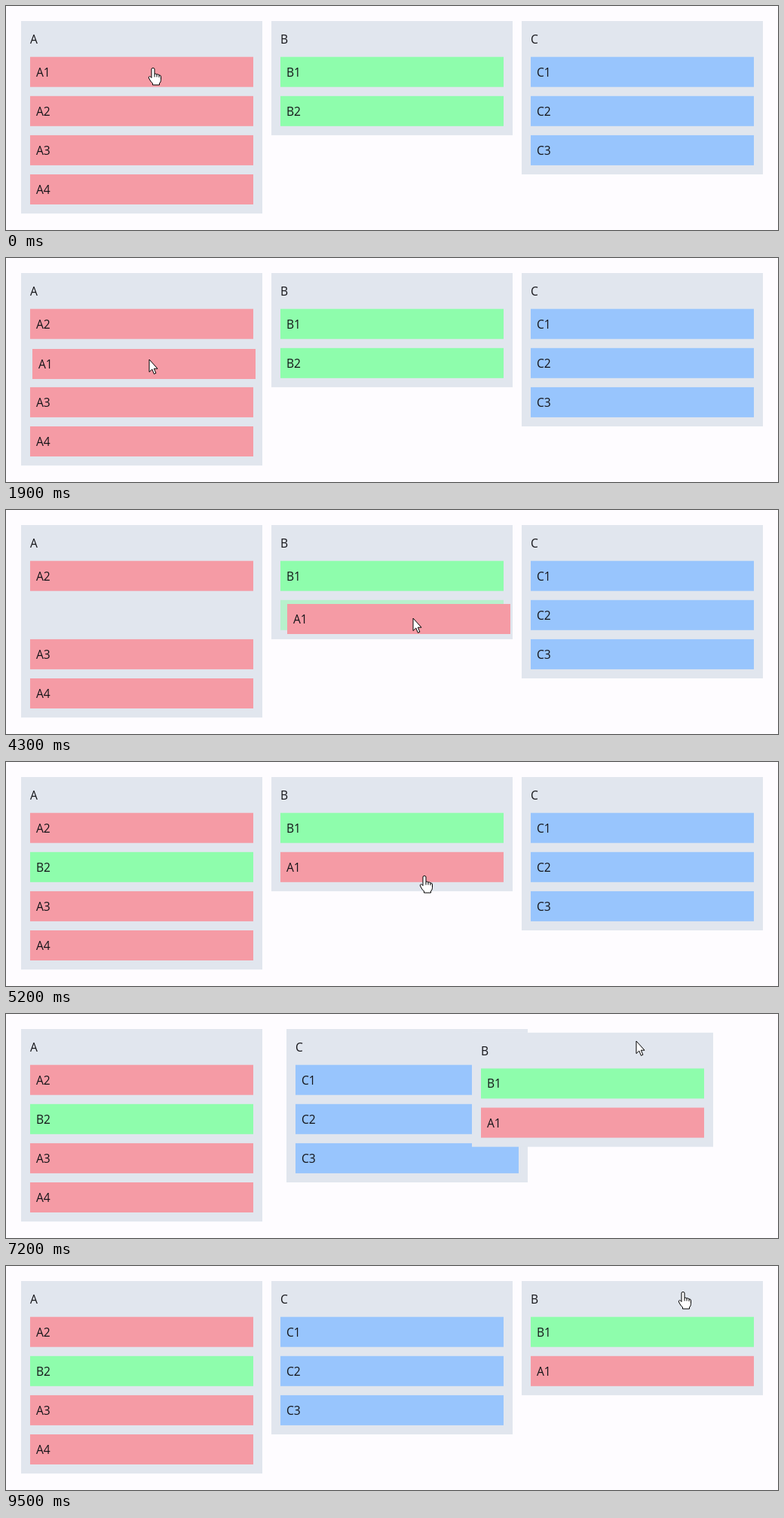
Write an HTML page with a canvas that moves like this. It is 1024 by 298 pixels and loops after 9.9 s.

```html
<!DOCTYPE html>
<html lang="en">
<head>
<meta charset="utf-8">
<title>Drag and drop columns</title>
<style>
html, body { margin: 0; width: 100%; height: 100%; overflow: hidden; background: #fefcff; }
canvas { display: block; }
</style>
</head>
<body>
<canvas id="stage" width="1024" height="298"></canvas>
<script>
const ctx = document.getElementById('stage').getContext('2d');
const LOOP = 9900, STEP = 100, DROP = 5100;
const PAD = 12, WIDTH = 320, TOP = 20;
const HEAD = 47.7, CARD = 40, PITCH = 52.1;
const COLORS = { A: '#f59ba5', B: '#8efdac', C: '#98c5fd' };

const slot = i => 20 + i * (WIDTH + PAD);
const cardY = i => TOP + HEAD + i * PITCH;

function ease(t, from, to) {
  const p = Math.min(1, Math.max(0, (t - from) / (to - from)));
  return p * p * (3 - 2 * p);
}
const slide = (a, b, t, from, to) => a + (b - a) * ease(t, from, to);

// Each leg eases to its end point; bow bends it up (-) or down (+)
function travel(t, x, y, legs) {
  for (const leg of legs) {
    if (t < leg.from) break;
    const p = ease(t, leg.from, leg.to);
    x += (leg.x - x) * p;
    y += (leg.y - y) * p + (leg.bow || 0) * Math.sin(Math.PI * p);
  }
  return { x: Math.round(x), y };
}

const cardAt = t => travel(t, slot(0) + PAD, cardY(0), [
  { from: 100, to: 1100, x: 32, y: 159 },
  { from: 1200, to: 1600, x: 426, y: 120, bow: 75 },
  { from: 1600, to: 1900, x: 35, y: 121, bow: -80 },
  { from: 1900, to: 2000, x: 32, y: cardY(1) },
  { from: 2300, to: 3300, x: 65, y: 121, bow: -35 },
  { from: 3400, to: 4300, x: 373, y: 125, bow: -40 },
  { from: 4300, to: 4800, x: 390, y: 136 }
]);

const columnAt = t => travel(t, slot(1), TOP, [
  { from: 6500, to: 7300, x: 630, y: 25 },
  { from: 7400, to: 7800, x: 365, y: 47 },
  { from: 7800, to: 8400, x: 679, y: 22 },
  { from: 8600, to: 8800, x: slot(2), y: TOP }
]);

// The pointer keeps its grip on whatever is dragged, with a little lag
function pointerAt(t, held) {
  if (t < 2300) return { x: held.x + slide(163, 155, t, 0, 1900), y: held.y + 14 };
  if (t < DROP) {
    return { x: held.x + slide(182, 167, t, 3300, 4300), y: held.y + slide(14, 19, t, 2300, 3500) };
  }
  if (t < 6500) return travel(t, 555, 154, [{ from: DROP, to: 6100, x: 566, y: 31 }]);
  return {
    x: held.x + slide(214, 218, t, 6500, 7200) - slide(0, 4, t, 8400, 8800),
    y: held.y + slide(11, 14, t, 8400, 8800)
  };
}

const within = (t, from, to) => t >= from && t < to;
const isHovering = t => t < 200 || within(t, 2000, 2400) || within(t, DROP, 6300) || t >= 8800;

function rect(x, y, w, h, fill) {
  ctx.fillStyle = fill;
  ctx.fillRect(x, y, w, h);
}

function label(text, x, y) {
  ctx.fillStyle = '#141418';
  ctx.fillText(text, x, y);
}

function card(name, x, y, alpha = 1) {
  ctx.globalAlpha = alpha;
  rect(x, y, WIDTH - 2 * PAD, CARD, COLORS[name[0]]);
  label(name, x + 8, Math.round(y + 26));
  ctx.globalAlpha = 1;
}

// Entries of items may be null for an open slot
function column(name, x, y, items, faded) {
  rect(x, y, WIDTH, HEAD + items.length * PITCH, '#e1e6ee');
  label(name, x + PAD, Math.round(y + 30));
  items.forEach((item, i) => {
    if (item) card(item, x + PAD, y + HEAD + i * PITCH, item === faded ? 0.5 : 1);
  });
}

const arrow = new Path2D('M0 0V16.6L3.8 13L6.4 19.3L8.9 18.2L6.3 12.2H11Z');
const hand = new Path2D('M-2 13.5V2Q-2 .5 0 .5T2 2V8.5Q3.5 7.5 5 9Q7 8.3 8 10Q10.5 9.7 10.5 12V16.5' +
  'Q10.5 19 8.5 21V23H-.5V21Q-3.5 18.5-5.5 14Q-6.3 12-4.6 11.6Q-3.3 11.5-2 13.5Z');
const creases = new Path2D('M2 8.5V12.5M5 9V12.5M8 10V13');

function pointer({ x, y }, isHand) {
  const shape = isHand ? hand : arrow;
  ctx.save();
  ctx.translate(Math.round(x), Math.round(y));
  ctx.lineJoin = 'round';
  ctx.fillStyle = '#fff';
  ctx.strokeStyle = '#000';
  ctx.fill(shape);
  ctx.stroke(shape);
  if (isHand) ctx.stroke(creases);
  ctx.restore();
}

function draw(t) {
  rect(0, 0, 1024, 298, '#fefcff');
  ctx.font = '15.6px "Open Sans", "Noto Sans", sans-serif';
  const dropped = t >= DROP;
  const held = dropped ? columnAt(t) : cardAt(t);
  const blues = ['C1', 'C2', 'C3'];

  if (dropped) {
    column('A', slot(0), TOP, ['A2', 'B2', 'A3', 'A4']);
    column('C', Math.round(slide(slot(2), slot(1), t, 6970, 7240)), TOP, blues);
    column('B', held.x, held.y, ['B1', 'A1']);
  } else {
    const over = held.x > 200 ? (held.y < 80 ? 'B1' : 'B2') : '';
    column('A', slot(0), TOP, [null, null, 'A3', 'A4']);
    column('B', slot(1), TOP, ['B1', 'B2'], over);
    column('C', slot(2), TOP, blues);
    card('A2', slot(0) + PAD, slide(cardY(1), cardY(0), t, 550, 800));
    card('A1', held.x, held.y);
  }
  pointer(pointerAt(t, held), isHovering(t));
}

const start = performance.now();
function tick() {
  const t = (performance.now() - start) % LOOP;
  draw(Math.floor(t / STEP) * STEP);
  requestAnimationFrame(tick);
}
tick();
</script>
</body>
</html>
```
